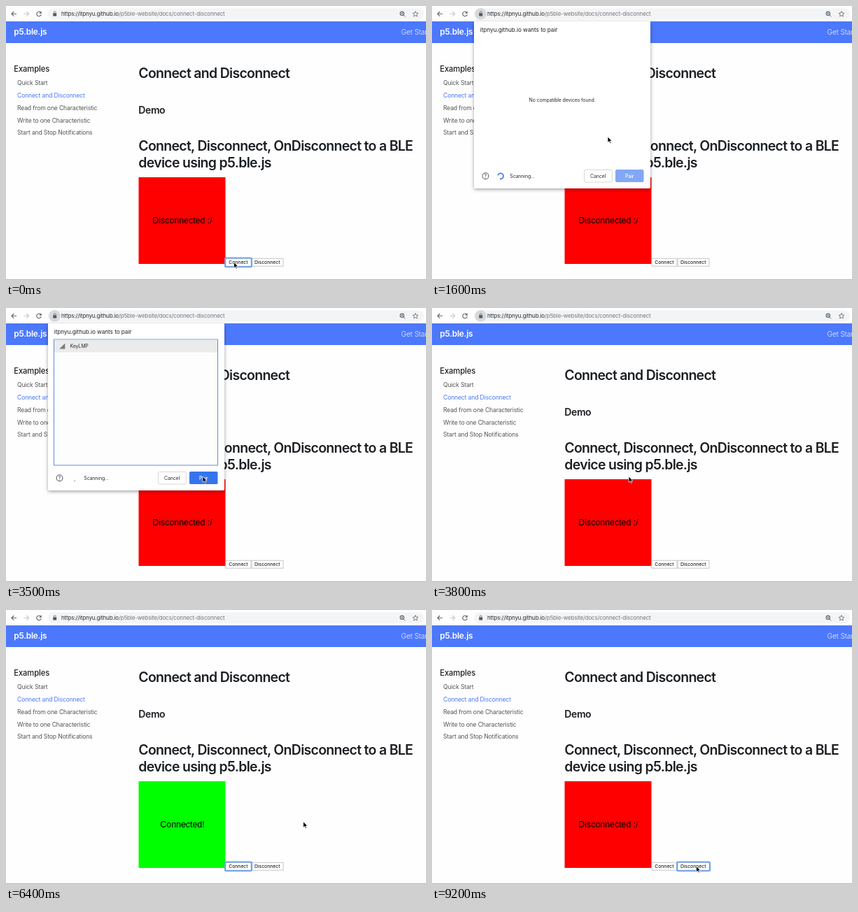
Write an HTML page that moves like this. It is 600 px wide and 392 px high and loops after 9400 ms.

```html
<!DOCTYPE html>
<html lang="en">
<head>
<meta charset="utf-8">
<title>Connect and Disconnect</title>
<style>
  html, body { margin: 0; width: 100%; height: 100%; overflow: hidden; background: #fff; }
  svg { display: block; width: 600px; height: 392px; }
  text { font-family: Inter, Roboto, sans-serif; font-optical-sizing: none; white-space: pre; }
  .line { fill: none; stroke: #5f6368; stroke-width: 1.1; }
  .url { font-size: 8px; letter-spacing: -.15px; fill: #2b2d30; }
  .h1 { font-size: 19.4px; font-weight: 600; letter-spacing: -.66px; fill: #1c1f23; }
  .h3 { font-size: 14px; font-weight: 600; letter-spacing: -.4px; fill: #1c1f23; }
  .h5 { font-size: 11.2px; font-weight: 500; letter-spacing: -.1px; fill: #1c1f23; }
  .nav { font-size: 8.6px; letter-spacing: -.15px; fill: #555; }
  .btn { font-size: 6.85px; fill: #000; }
  .small { font-size: 7px; letter-spacing: -.14px; fill: #2c2e31; }
  .state { font: 12.4px "Liberation Sans", Arial, sans-serif; text-anchor: middle; }
  .button { fill: #fff; stroke: #b9b9b9; stroke-width: .8; }
  .ring { fill: none; stroke: #6fa3ee; stroke-width: 2; }
</style>
</head>
<body>
<svg viewBox="0 0 600 392">
  <defs>
    <filter id="shadow" x="-10%" y="-10%" width="120%" height="120%">
      <feDropShadow dx="0" dy="1.5" stdDeviation="2.8" flood-opacity=".38"/>
    </filter>
  </defs>
  <rect width="600" height="392" fill="#fefefe"/>

  <!-- browser bar -->
  <rect x="60" y="3.5" width="537" height="15.5" rx="7.75" fill="#f3f4f5"/>
  <path class="line" d="M15 11.3H8M11.2 8L7.9 11.3l3.3 3.3"/>
  <path class="line" style="stroke:#c4c6c9" d="M25.5 11.3h7M29.3 8l3.3 3.3-3.3 3.3"/>
  <path class="line" d="M49.6 9.2A3.3 3.3 0 1 0 50.3 12.2"/>
  <path d="M50.7 7.2v3.5h-3.5z" fill="#5f6368"/>
  <circle id="halo" cx="69.5" cy="11.3" r="8.3" fill="#d7d9dc"/>
  <rect x="67.2" y="10.2" width="5" height="4.2" rx=".6" fill="#55585c"/>
  <path class="line" style="stroke-width:.8" d="M68.3 10.4V9.2a1.4 1.4 0 0 1 2.8 0v1.2"/>
  <text class="url" x="79" y="14.2">https://itpnyu.github.io<tspan fill="#74777b">/p5ble-website/docs/connect-disconnect</tspan></text>
  <g class="line">
    <circle cx="565.8" cy="10.8" r="2.7"/>
    <path d="M567.8 12.8l2.5 2.5M564.5 10.8h2.6M565.8 9.5v2.6" stroke-width=".9"/>
    <path d="M585 7.5l1.1 2.6 2.8.2-2.1 1.9.6 2.7-2.4-1.4-2.4 1.4.6-2.7-2.1-1.9 2.8-.2z" stroke-width=".8"/>
  </g>

  <!-- page -->
  <rect y="22" width="600" height="31" fill="#4c78fe"/>
  <text x="11.3" y="41.4" font-size="11.8" font-weight="600" letter-spacing="-.2" fill="#fff">p5.ble.js</text>
  <text x="564.5" y="41" font-size="10.2" font-weight="300" letter-spacing="-.1" fill="#eef2ff">Get Started</text>
  <text class="h5" x="11.3" y="93.9">Examples</text>
  <g id="menu"></g>
  <text class="h1" x="189.3" y="102.8">Connect and Disconnect</text>
  <text class="h3" x="189.3" y="153.8">Demo</text>
  <text class="h1" x="189.3" y="206.8">Connect, Disconnect, OnDisconnect to a BLE</text>
  <text class="h1" x="189.3" y="231">device using p5.ble.js</text>
  <rect id="canvas" x="189.5" y="245" width="124" height="124"/>
  <text id="state" class="state" x="252" y="311.3"></text>
  <rect class="button" x="314" y="361.2" width="36" height="11"/>
  <rect class="button" x="351" y="361.2" width="45" height="11"/>
  <rect id="ring1" class="ring" x="313" y="360.4" width="38" height="12.8" rx="1.5"/>
  <rect id="ring2" class="ring" x="350" y="360.4" width="47" height="12.8" rx="1.5"/>
  <text class="btn" x="318.2" y="369.2">Connect</text>
  <text class="btn" x="355" y="369.2">Disconnect</text>
  <path d="M0 391.5h600" stroke="#b4b4b4"/>

  <!-- pairing dialog -->
  <g id="dialog">
    <path d="M60 22H312V259a2 2 0 0 1-2 2H62a2 2 0 0 1-2-2z" fill="#fff" filter="url(#shadow)"/>
    <text x="68.8" y="37.2" font-size="8.2" letter-spacing="-.05" fill="#202124">itpnyu.github.io wants to pair</text>
    <text id="empty" class="small" x="138.5" y="137.4">No compatible devices found.</text>
    <g id="list">
      <rect id="frame" x="68.5" y="45" width="234" height="180" fill="#fdfdfd"/>
      <rect id="row" x="69" y="45.5" width="233" height="18" fill="#ebebeb"/>
      <path d="M84.3 50.5v8h-8z" fill="#7b7b7b"/>
      <text class="small" x="91.4" y="57.2">KeyLMP</text>
    </g>
    <circle class="line" cx="76.5" cy="243.2" r="4.4" stroke-width="1"/>
    <text x="76.5" y="245.8" font-size="7" font-weight="600" text-anchor="middle" fill="#5f6368">?</text>
    <path id="spinner" fill="none" stroke="#3b78e7" stroke-width="1.7"/>
    <text class="small" x="111.3" y="245.6">Scanning...</text>
    <rect x="217.5" y="234.5" width="40" height="17.5" rx="1.8" fill="#fff" stroke="#d6d8db"/>
    <text class="small" x="226" y="245.8">Cancel</text>
    <rect id="pair" x="262" y="234" width="40.5" height="18" rx="1.8"/>
    <text class="small" x="276" y="245.8" style="fill:#fff;font-weight:500">Pair</text>
  </g>

  <path id="cursor" d="M0 0v8.4l2-1.8 1.3 3 1.4-.6-1.3-2.9h2.7z" stroke="#fff" stroke-width=".7"/>
</svg>
<script>
const LOOP = 9400, STEP = 100;
const OPEN = 500, FOUND = 1800, PICK = 2400, CLOSE = 3800, FOCUS = 3900, JOIN = 5100, LEAVE = 7800;
const $ = id => document.getElementById(id);
const show = (id, on) => $(id).style.display = on ? "" : "none";
const smooth = k => k * k * (3 - 2 * k);

// [time, x, y] of the pointer tip
const path = [
  [0, 325.5, 366.5], [700, 325.5, 366.5], [1400, 251, 187], [1700, 251, 187],
  [2400, 156, 58.5], [2700, 156, 58.5], [3400, 281, 241], [4000, 281, 241],
  [4300, 457, 257], [6000, 457, 257], [6900, 379.5, 367], [8300, 379.5, 367],
  [8600, 377.5, 366.5], [LOOP, 377.5, 366.5]
];

["Quick Start", "Connect and Disconnect", "Read from one Characteristic",
 "Write to one Characteristic", "Start and Stop Notifications"].forEach((label, i) => {
  const fill = i === 1 ? ' style="fill:#4a76fd"' : "";
  $("menu").innerHTML += `<text class="nav" x="16" y="${112.8 + i * 17.9}"${fill}>${label}</text>`;
});

function pointer(t) {
  const i = path.findIndex(p => p[0] > t);
  const [t0, x0, y0] = path[i - 1], [t1, x1, y1] = path[i];
  const k = smooth((t - t0) / (t1 - t0));
  return [x0 + (x1 - x0) * k, y0 + (y1 - y0) * k];
}

// cubic-bezier(.4, 0, .2, 1)
function ease(x) {
  let lo = 0, hi = 1, s;
  for (let i = 0; i < 16; i++) {
    s = (lo + hi) / 2;
    const bx = 1.2 * s * (1 - s) ** 2 + .6 * s * s * (1 - s) + s ** 3;
    if (bx < x) lo = s; else hi = s;
  }
  return smooth(s);
}

// the arc grows to 270 degrees, then its tail catches up, while all turns
function spinner(ms) {
  const half = Math.floor(ms / 666);
  const start = 270 + 360 * ms / 1568 + 270 * Math.floor(half / 2);
  const sweep = 270 * (ease(ms % 666 / 666) - (half % 2 ? 0 : 1));
  const at = deg => {
    const a = deg * Math.PI / 180;
    return `${98 + 4 * Math.cos(a)} ${243.3 + 4 * Math.sin(a)}`;
  };
  return `M${at(start)}A4 4 0 ${+(Math.abs(sweep) > 180)} ${+(sweep > 0)} ${at(start + sweep)}`;
}

function draw(now) {
  const t = Math.floor(now % LOOP / STEP) * STEP;
  const open = t >= OPEN && t < CLOSE, picked = t >= PICK, joined = t >= JOIN && t < LEAVE;
  show("dialog", open);
  show("halo", t >= OPEN && t < FOCUS);
  show("ring1", t < OPEN || t >= FOCUS && t < LEAVE);
  show("ring2", t >= LEAVE);
  show("empty", t < FOUND);
  show("list", t >= FOUND);
  show("row", picked);
  $("frame").setAttribute("stroke", picked ? "#5f8bdd" : "none");
  $("pair").setAttribute("fill", picked ? "#3674ee" : "#82a8f5");
  if (open) $("spinner").setAttribute("d", spinner(t - 350));
  $("canvas").setAttribute("fill", joined ? "#0f0" : "#f00");
  $("state").textContent = joined ? "Connected!" : "Disconnected :/";
  $("cursor").setAttribute("transform", `translate(${pointer(t)})`);
}

const begin = performance.now();
function tick() {
  draw(performance.now() - begin);
  requestAnimationFrame(tick);
}
tick();
</script>
</body>
</html>
```
